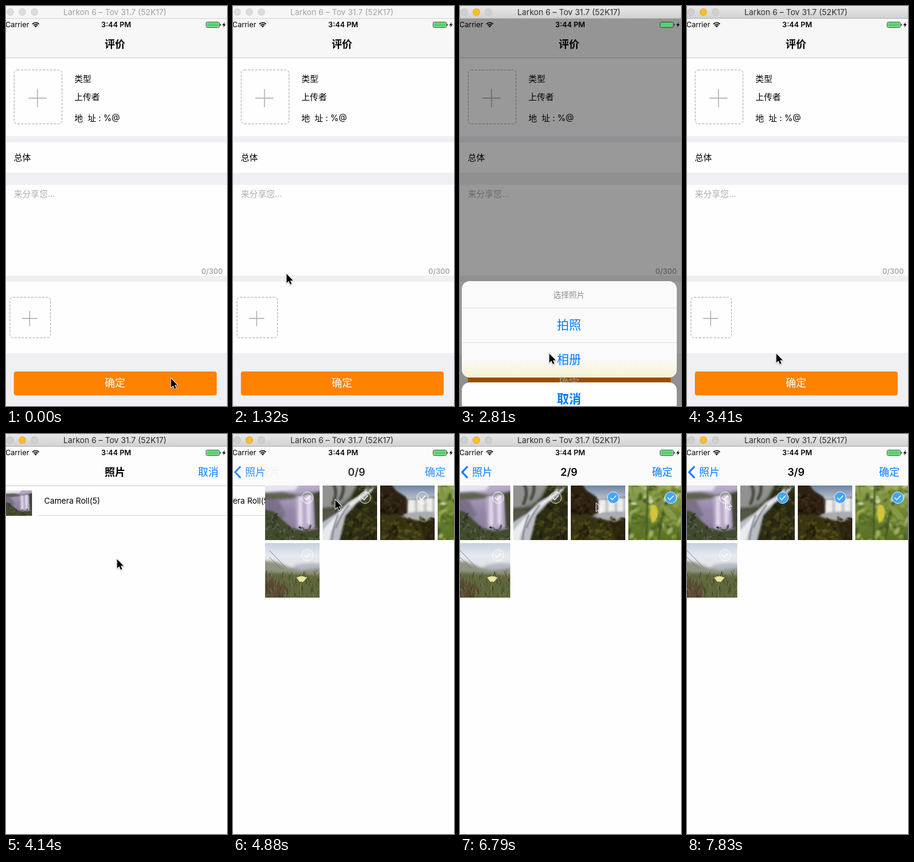
An HTML page with a canvas for the animation above (8 s loop, 365 by 660 pixels).

```html
<!DOCTYPE html>
<html lang="zh-CN">
<head>
<meta charset="utf-8">
<style>
html, body { margin: 0; width: 365px; height: 660px; overflow: hidden; }
canvas { display: block; }
</style>
</head>
<body>
<canvas id="stage" width="365" height="660"></canvas>
<script>
const W = 365, H = 660, LOOP = 8000, STEP = 148;
const BLUE = '#007aff';
const FONT = 'Inter, "Noto Sans CJK SC", "Noto Sans CJK", sans-serif';
const stage = document.getElementById('stage').getContext('2d');
let g = stage;

// ---------- helpers ----------
function rect(x, y, w, h, color) {
  g.fillStyle = color;
  g.fillRect(x, y, w, h);
}
function round(x, y, w, h, r, color) {
  g.beginPath();
  g.roundRect(x, y, w, h, r);
  g.fillStyle = color;
  g.fill();
}
function disc(x, y, r, color) {
  g.beginPath();
  g.arc(x, y, r, 0, 7);
  g.fillStyle = color;
  g.fill();
}
function shape(d, color) {
  g.fillStyle = color;
  g.fill(new Path2D(d));
}
function line(d, color, width = 1) {
  g.strokeStyle = color;
  g.lineWidth = width;
  g.stroke(new Path2D(d));
}
// y is the vertical middle of the glyphs
function text(s, x, y, size, color = '#000', align = 'left', weight = 400) {
  g.font = `${weight} ${size}px ${FONT}`;
  g.textAlign = align;
  g.fillStyle = color;
  g.fillText(s, x, y + size * .37);
}
function fade(y0, y1, ...colors) {
  const grad = g.createLinearGradient(0, y0, 0, y1);
  colors.forEach((c, i) => grad.addColorStop(i / (colors.length - 1), c));
  return grad;
}
function layer(draw) {
  g.save();
  draw();
  g.restore();
}
// linear interpolation in rows of [frame, ...values]
function track(keys, f) {
  const i = keys.findIndex(k => k[0] > f);
  if (i < 0) return keys[keys.length - 1].slice(1);
  if (i === 0) return keys[0].slice(1);
  const a = keys[i - 1], b = keys[i], p = (f - a[0]) / (b[0] - a[0]);
  return a.slice(1).map((v, n) => v + (b[n + 1] - v) * p);
}

// ---------- photos ----------
let seed = 7;
const rnd = () => (seed = seed * 16807 % 2147483647) / 2147483647;

function soft(px) {
  g.filter = px ? `blur(${px}px)` : 'none';
}
function specks(n, x, y, w, h, size, ...colors) {
  for (let i = 0; i < n; i++) {
    g.beginPath();
    g.ellipse(x + rnd() * w, y + rnd() * h, size * (.5 + rnd()), size * (.2 + rnd() * .5), rnd() * 3, 0, 7);
    g.fillStyle = colors[i % colors.length];
    g.fill();
  }
}
function photo(paint) {
  const c = document.createElement('canvas');
  c.width = c.height = 90;
  g = c.getContext('2d');
  paint();
  g = stage;
  return c;
}
const photos = [
  photo(() => {
    rect(0, 0, 90, 90, fade(0, 80, '#b9aecb', '#9688a8', '#8a7c9c'));
    soft(2);
    shape('M-9 -9H60L50 8L-9 13Z', '#e8e5f0');
    shape('M-9 13L30 11L55 16L99 8V20L50 21L20 24L-9 30Z', '#5d6150');
    shape('M-9 22L22 24L34 48L24 60L-9 58Z', '#7b6f8a');
    shape('M50 18L80 15L81 70L52 72Z', '#b9acc9');
    soft(1.5);
    shape('M55 18H61L62 66H55ZM68 16H76L75 64H69Z', '#ddd5e8');
    shape('M80 14L99 8V82L83 68Z', '#434533');
    shape('M-9 38L14 43L28 56L44 70L66 76L99 68V99H-9Z', '#414b2f');
    soft(.7);
    specks(60, -4, 66, 98, 24, 3, '#303b24', '#566141', '#47482f');
    specks(30, -4, 46, 26, 26, 3, '#2f3626', '#545a41');
  }),
  photo(() => {
    rect(0, 0, 90, 90, '#2b2c14');
    soft(1);
    specks(110, 30, 18, 60, 72, 4, '#1d1c0b', '#45421a', '#544c1d', '#2a3017');
    soft(2.5);
    shape('M-9 -9H62L46 20L28 36L-9 40Z', '#8f9290');
    shape('M-9 38L20 38L30 26L16 60L-9 66Z', '#54564a');
    soft(1.5);
    shape('M99 -9L78 13L56 30L38 50L26 99H-9V66L22 46L42 27L66 13L78 -9Z', '#b9bdc4');
    shape('M88 0L58 25L34 45L14 76L8 99H-9V84L18 54L46 28Z', '#e9ebef');
    line('M18 -2Q26 12 16 32M34 -2Q36 12 28 24', '#45483c', 5);
    soft(1);
    line('M26 48Q18 64 15 92M44 32Q28 50 22 70', '#707478', 2);
    specks(20, 60, 0, 30, 9, 4, '#34381f', '#5b5d3b');
  }),
  photo(() => {
    rect(0, 0, 90, 90, fade(0, 50, '#6d84a3', '#c3cad3', '#b4b6b8'));
    soft(1.5);
    shape('M-9 -9H14L26 8L40 17L46 24L99 18V50H-9Z', '#4a4130');
    shape('M46 24L99 19V52L44 54Z', '#c4c7ca');
    shape('M47 24H57V46H47ZM62 24L72 22V46H62ZM77 22L86 21V45H77Z', '#f0eeeb');
    shape('M-9 -9H12L26 10L42 20L44 48L-9 60Z', '#2c2113');
    shape('M36 48Q65 40 99 44V60L60 62Z', '#a9adb1');
    shape('M-9 50L22 46L46 54L72 60L99 56V99H-9Z', '#3a3413');
    soft(.8);
    specks(90, -4, 54, 98, 38, 4, '#4b4c16', '#211a0a', '#5f581d', '#30300f');
    specks(30, -4, 12, 40, 36, 4, '#181108', '#45331d', '#35281a');
    shape('M66 62L99 54V99H76Z', 'rgba(32,24,12,.6)');
  }),
  photo(() => {
    rect(0, 0, 90, 90, fade(0, 90, '#96a758', '#6d8432', '#586f25'));
    soft(1.5);
    specks(130, -4, -4, 98, 98, 6, '#748a34', '#9fae62', '#465c26', '#869c42', '#5c7529');
    specks(14, 0, 0, 90, 30, 4, '#ccd3a4', '#dbe0c0');
    soft(1);
    line('M32 0L30 90M70 10Q54 46 50 90', '#43562a', 2.5);
    shape('M37 32Q48 28 49 45Q49 58 39 62Q34 47 37 32Z', '#d4c43a');
    shape('M54 30Q75 38 82 58Q62 55 54 30Z', '#879b45');
  }),
  photo(() => {
    rect(0, 0, 90, 90, fade(0, 40, '#c6d1e0', '#e6e9ed', '#dfe2e6'));
    soft(2);
    shape('M50 36L74 33L99 34V50H40Z', '#b4bac2');
    shape('M-9 28L18 31L40 40L60 45L99 40V99H-9Z', '#8e9382');
    shape('M-9 48L35 50L99 54V99H-9Z', '#5f673d');
    shape('M-9 62L20 60L34 72L30 99H-9Z', '#5b4a36');
    soft(.7);
    for (let i = 0; i < 110; i++) {
      const x = rnd() * 90, y = 56 + rnd() * 38;
      line(`M${x} ${y}l${rnd() * 8 - 4} ${-5 - rnd() * 9}`, ['#414d25', '#737848', '#7a6246', '#343f20'][i % 4]);
    }
    line('M7 12L34 40M7 23L26 42', '#747980', .9);
    shape('M52 57Q60 52 69 57L63 64H57Z', '#e8e6a0');
    line('M60 63L58 88', '#6f8042', 1.5);
  })
];

// ---------- screens ----------
function navBar(color) {
  rect(0, 21, W, 64, color);
  rect(0, 85, W, 1, '#c9c9cc');
}
function addBox(x, y, w, h, cx, cy, arm) {
  g.setLineDash([4, 2]);
  g.beginPath();
  g.roundRect(x + .5, y + .5, w - 1, h - 1, 5);
  g.strokeStyle = '#aaa';
  g.lineWidth = 1;
  g.stroke();
  g.setLineDash([]);
  line(`M${cx - arm} ${cy}h${2 * arm}M${cx} ${cy - arm}v${2 * arm}`, '#aaa', 1.4);
}
function formScreen() {
  rect(0, 21, W, H, '#efeff4');
  navBar('#f7f7f8');
  text('评价', 180, 63, 17, '#000', 'center', 600);
  [[86, 129], [225, 50], [295, 150], [455, 118]].forEach(([y, h]) => rect(0, y, W, h, '#fefefe'));
  addBox(13, 105, 80, 90, 52, 152, 15);
  text('类型', 113, 120, 14);
  text('上传者', 113, 150, 14);
  text('地  址 : %@', 113, 185, 14);
  text('总体', 13, 250, 14);
  text('来分享您...', 13, 310, 14, '#adadad');
  text('0/300', 358, 438, 12, '#999', 'right', 500);
  addBox(6, 480, 68, 68, 39, 515.5, 12.5);
  round(13, 603, 335, 39.5, 4, '#ff8200');
  text('确定', 180, 622, 17, '#fff', 'center');
}

function actionSheet(offset, dim) {
  rect(0, 21, W, H, `rgba(0,0,0,${dim})`);
  const top = 454 + offset;
  layer(() => {
    g.beginPath();
    g.roundRect(3, top, 355, 159, 13);
    g.clip();
    rect(0, top, W, 160, '#fafafa');
    // warm glow of the button behind the panel
    rect(0, 583, W, 80, fade(583, 663, 'rgba(243,229,170,0)', 'rgba(245,238,178,.72)', 'rgba(238,235,205,.35)'));
    rect(3, top + 44, 355, 1, '#dedee0');
    rect(3, top + 101, 355, 1, '#dedee0');
  });
  text('选择照片', 180, top + 22, 13, '#8f8f8f', 'center', 500);
  text('拍照', 180, top + 73, 20, BLUE, 'center');
  text('相册', 180, top + 130, 20, BLUE, 'center');
  round(3, top + 167, 355, 57, 13, '#fefefe');
  text('取消', 180, top + 195, 20, BLUE, 'center', 600);
}

// p runs from 0 (list shown) to 1 (pushed away)
function listScreen(y, p) {
  layer(() => {
    g.beginPath();
    g.rect(0, 21, W, H);
    g.clip();
    g.translate(0, y);
    rect(0, 21, W, H, '#fefefe');
    navBar('#fdfdfd');
    g.globalAlpha = 1 - p;
    text('照片', 180 - 143 * p, 63, 17, '#000', 'center', 600);
    text('取消', 334, 63, 17, BLUE, 'center');
    g.globalAlpha = 1;
    g.translate(-110 * p, 0);
    g.drawImage(photos[0], 6, 0, 84, 90, 0, 93, 43, 42);
    text('Camera Roll(5)', 63, 110, 13.2);
    rect(53, 134, 500, 1, '#dcdcde');
  });
}

function check(x, y, age) {
  layer(() => {
    g.translate(x, y);
    if (age >= 0) {
      const s = [1.18, .93][age] || 1;
      g.scale(s, s);
    }
    disc(0, 0, 9.5, age >= 0 ? '#45a5f8' : 'rgba(255,255,255,.14)');
    line('M-9.5 0a9.5 9.5 0 1 0 19 0a9.5 9.5 0 1 0 -19 0', 'rgba(255,255,255,.85)');
    line('M-5 0L-1.5 3.5L5 -3.5', '#fff', 1.3);
  });
}

const picked = [99, 50, 43, 39, 99];

function gridScreen(x, f) {
  const p = 1 - x / W;
  layer(() => {
    g.translate(x, 0);
    rect(0, 85, W, H, '#fefefe');
    photos.forEach((img, i) => {
      const tx = -7 + i % 4 * 95, ty = 85 + (i >> 2) * 95;
      g.drawImage(img, tx, ty);
      check(tx + 70, ty + 20, f - picked[i]);
    });
  });
  layer(() => {
    g.globalAlpha = p;
    rect(0, 21, W, 64, '#fbfbfb');
    line('M12.5 53.5L3.5 63L12.5 72.5', BLUE, 3);
    text('照片', 20, 63, 17, BLUE);
    text(picked.filter(k => f >= k).length + '/9', 180 + x * .4, 63, 17, '#000', 'center', 600);
    text('确定', 334, 63, 17, BLUE, 'center');
  });
}

// ---------- window and status bar ----------
function titleBar(active) {
  rect(0, 0, W, 20, active ? fade(0, 20, '#e9e9e9', '#d1d1d1') : '#f6f6f6');
  rect(0, 20, W, 1, active ? '#b3b3b3' : '#d5d5d5');
  [7, 27, 47].forEach((x, i) => {
    const lit = active && i === 1;
    disc(x, 10, 6, lit ? '#dfa023' : active ? '#bcbcbc' : '#cfcfcf');
    disc(x, 10, 5.3, lit ? '#fdbd2e' : active ? '#d0d0d0' : '#dcdcdc');
  });
  text('Larkon 6 – Tov 31.7 (52K17)', 180, 10, 13.2, active ? '#2c2c2c' : '#a0a0a0', 'center');
}
function statusBar() {
  text('Carrier', -1, 31, 12);
  for (const r of [7.5, 4.5]) {
    g.beginPath();
    g.arc(49, 35, r, -Math.PI * .76, -Math.PI * .24);
    g.strokeStyle = '#000';
    g.lineWidth = 1.7;
    g.stroke();
  }
  shape('M49 35.5L46.8 33Q49 31.4 51.2 33Z', '#000');
  text('3:44 PM', 182, 31, 12, '#000', 'center', 600);
  g.beginPath();
  g.roundRect(330.5, 26.5, 22, 9, 2);
  g.strokeStyle = '#444';
  g.lineWidth = 1;
  g.stroke();
  round(331.5, 27.5, 20, 7, 1, '#4cd964');
  rect(353.5, 29.5, 1.5, 3, '#444');
  shape('M361.5 26.5L357 31.8H359.8L358.5 35.5L363 30.2H360.2Z', '#000');
}
// over the photos only the outline of the pointer shows
function pointer([x, y], hollow) {
  layer(() => {
    g.translate(x, y);
    g.lineJoin = 'round';
    const d = 'M.5 .5V15.5L4 12.3L6.4 17.8L8.9 16.7L6.5 11.4H11.2Z';
    if (hollow) return line(d, '#fff', 1);
    g.shadowColor = 'rgba(0,0,0,.3)';
    g.shadowBlur = 2;
    g.shadowOffsetY = 1;
    line(d, '#fff', 1.8);
    g.shadowColor = 'transparent';
    shape(d, '#000');
  });
}

// ---------- motion ----------
const pointerPath = [
  [0, 272, 614], [2, 298, 641], [5, 221, 533], [6, 221, 533], [8, 140, 379],
  [10, 36, 504], [15, 36, 504], [19, 147, 573], [24, 147, 573], [28, 183, 206],
  [30, 110, 108], [32, 110, 108], [35, 285, 108], [37, 345, 102], [40, 345, 102],
  [42, 253, 105], [43, 253, 105], [46, 210, 117], [47, 188, 118], [48, 166, 107],
  [50, 166, 107], [51, 140, 113], [53, 63, 108]
];
// [frame, offset, dim]
const sheetMove = [
  [12, 220, 0], [13, 171, .11], [14, 48, .3], [15, 9, .38], [16, 0, .4],
  [21, 0, .4], [22, 110, .2], [23, 220, 0]
];
const listRise = [[24, 640], [25, 480], [26, 150], [27, 24], [28, 0]];
const gridPush = [[31, W], [32, 275], [33, 60], [34, 9], [35, 1], [36, 0]];

function frame(now) {
  const f = Math.min(53, Math.floor((now % LOOP + 14) / STEP));
  if (f < 36) formScreen();
  if (f > 12 && f < 23) actionSheet(...track(sheetMove, f));
  const [push] = track(gridPush, f);
  if (f > 24) listScreen(track(listRise, f)[0], 1 - push / W);
  if (f > 31) gridScreen(push, f);
  titleBar(f > 12);
  statusBar();
  pointer(track(pointerPath, f), f > 33);
  requestAnimationFrame(frame);
}
requestAnimationFrame(frame);
</script>
</body>
</html>
```
